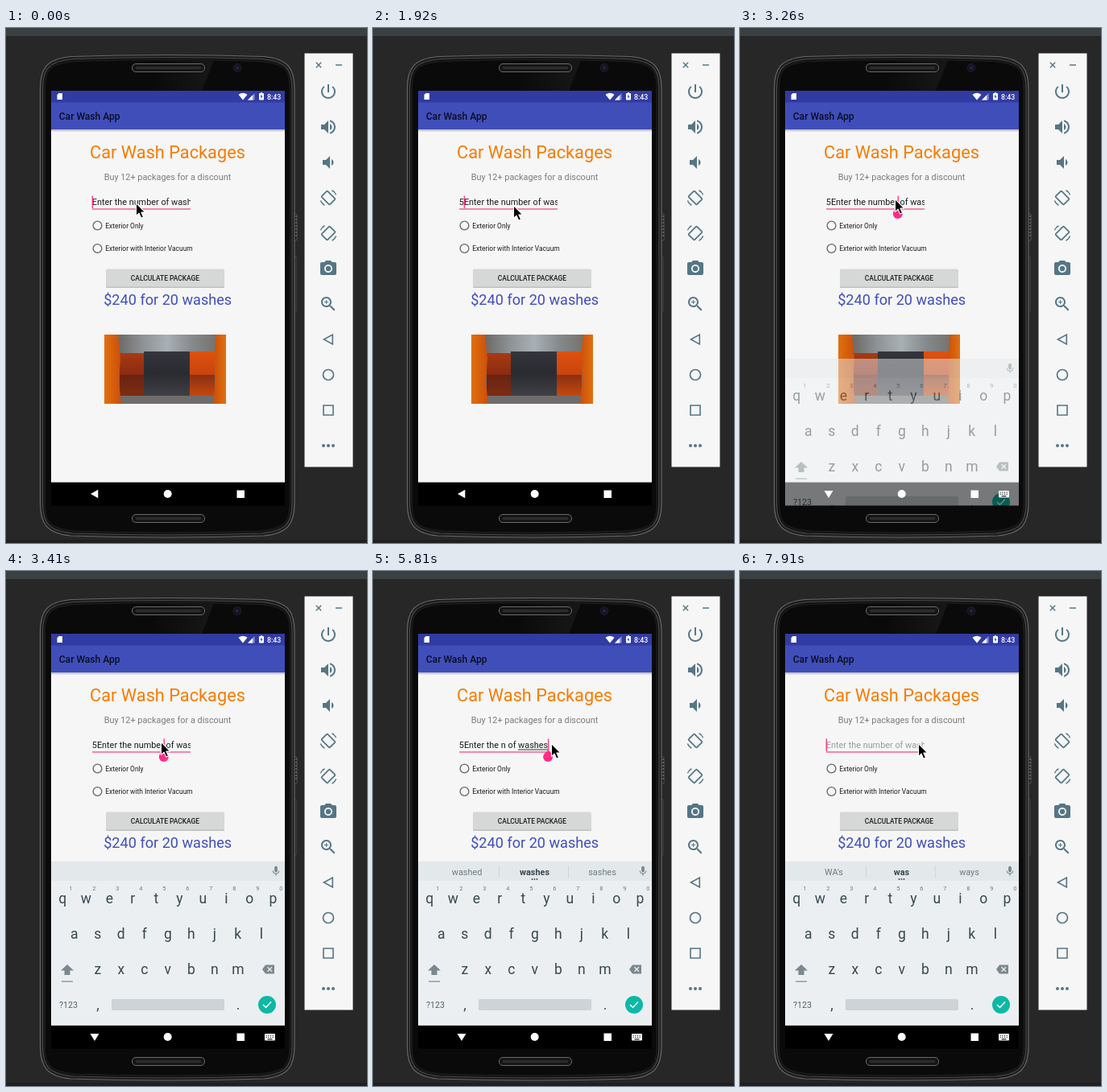
Write an HTML page with a canvas that moves like this. It is 448 px wide and 640 px high and loops after 8000 ms.

```html
<!DOCTYPE html>
<html lang="en">
<head>
<meta charset="utf-8">
<title>Car Wash App</title>
<style>
html, body { margin: 0; width: 100%; height: 100%; overflow: hidden; background: #272727; }
canvas { display: block; width: 448px; height: 640px; }
</style>
</head>
<body>
<canvas id="stage" width="448" height="640"></canvas>
<script>
const W = 448, H = 640, LOOP = 8000;
const DP = 290 / 480;
const PINK = '#f0407f', SLATE = '#37474f', STEEL = '#557686';
const view = document.getElementById('stage').getContext('2d');
let g = view;

function layer(paint) {
  const c = document.createElement('canvas');
  c.width = W;
  c.height = H;
  const prev = g;
  g = c.getContext('2d');
  paint();
  g = prev;
  return c;
}

function rect(x, y, w, h, fill) {
  g.fillStyle = fill;
  g.fillRect(x, y, w, h);
}

function round(x, y, w, h, r, fill, stroke, lw = 1) {
  g.beginPath();
  g.roundRect(x, y, w, h, r);
  finish(fill, stroke, lw);
}

function disc(x, y, r, fill, stroke, lw = 1) {
  g.beginPath();
  g.arc(x, y, r, 0, 7);
  finish(fill, stroke, lw);
}

function poly(pts, fill, stroke, lw = 1) {
  g.beginPath();
  for (let i = 0; i < pts.length; i += 2) g.lineTo(pts[i], pts[i + 1]);
  g.closePath();
  finish(fill, stroke, lw);
}

function line(x1, y1, x2, y2, color, lw = 1) {
  g.beginPath();
  g.moveTo(x1, y1);
  g.lineTo(x2, y2);
  finish(null, color, lw);
}

function finish(fill, stroke, lw) {
  if (fill) { g.fillStyle = fill; g.fill(); }
  if (stroke) { g.strokeStyle = stroke; g.lineWidth = lw; g.stroke(); }
}

function font(size, weight = 400) {
  g.font = `${weight} ${size}px Roboto, sans-serif`;
}

function text(s, x, y, size, color, align = 'left', weight = 400) {
  font(size, weight);
  g.textAlign = align;
  g.fillStyle = color;
  g.fillText(s, x, y);
}

// 24-unit icon centred on x, y
function icon(d, x, y, color, scale = 1) {
  g.save();
  g.translate(x, y);
  g.scale(scale, scale);
  g.translate(-12, -12);
  g.fillStyle = color;
  g.fill(new Path2D(d));
  g.restore();
}

function gradient(x1, y1, x2, y2, ...colors) {
  const gr = g.createLinearGradient(x1, y1, x2, y2);
  colors.forEach((c, i) => gr.addColorStop(i / (colors.length - 1), c));
  return gr;
}

const ICONS = {
  power: 'M13 3h-2v10h2V3zm4.83 2.17l-1.42 1.42C17.99 7.86 19 9.81 19 12c0 3.87-3.13 7-7 7s-7-3.13-7-7c0-2.19 1.01-4.14 2.58-5.42L6.17 5.17C4.23 6.82 3 9.26 3 12c0 4.97 4.03 9 9 9s9-4.03 9-9c0-2.74-1.23-5.18-3.17-6.83z',
  louder: 'M3 9v6h4l5 5V4L7 9H3zm13.5 3c0-1.77-1.02-3.29-2.5-4.03v8.05c1.48-.73 2.5-2.25 2.5-4.02zM14 3.23v2.06c2.89.86 5 3.54 5 6.71s-2.11 5.85-5 6.71v2.06c4.01-.91 7-4.49 7-8.77s-2.99-7.86-7-8.77z',
  softer: 'M18.5 12c0-1.77-1.02-3.29-2.5-4.03v8.05c1.48-.73 2.5-2.25 2.5-4.02zM5 9v6h4l5 5V4L9 9H5z',
  camera: 'M9 2L7.17 4H4c-1.1 0-2 .9-2 2v12c0 1.1.9 2 2 2h16c1.1 0 2-.9 2-2V6c0-1.1-.9-2-2-2h-3.17L15 2H9zm3 15c-2.76 0-5-2.24-5-5s2.24-5 5-5 5 2.24 5 5-2.24 5-5 5z',
  zoom: 'M15.5 14h-.79l-.28-.27C15.41 12.59 16 11.11 16 9.5 16 5.91 13.09 3 9.5 3S3 5.91 3 9.5 5.91 16 9.5 16c1.61 0 3.09-.59 4.23-1.57l.27.28v.79l5 4.99L20.49 19l-4.99-5zm-6 0C7.01 14 5 11.99 5 9.5S7.01 5 9.5 5 14 7.01 14 9.5 11.99 14 9.5 14zM12 10h-2v2H9v-2H7V9h2V7h1v2h2v1z',
  mic: 'M12 14c1.66 0 3-1.34 3-3V5c0-1.66-1.34-3-3-3S9 3.34 9 5v6c0 1.66 1.34 3 3 3zm5.3-3c0 3-2.54 5.1-5.3 5.1S6.7 14 6.7 11H5c0 3.41 2.72 6.23 6 6.72V21h2v-3.28c3.28-.48 6-3.3 6-6.72h-1.7z'
};

// Phone outline with gently arched ends, inset by d
function shell(d, fill, stroke, lw) {
  const l = 42.5 + d, r = 358 - d, t = 33.5 + d, b = 633 - d, mid = (l + r) / 2;
  g.beginPath();
  g.moveTo(l, 76);
  g.bezierCurveTo(l, 50, l + 8, t + 5, l + 38, t + 2);
  g.quadraticCurveTo(mid, t - 2, r - 38, t + 2);
  g.bezierCurveTo(r - 8, t + 5, r, 50, r, 76);
  g.lineTo(r, 590);
  g.bezierCurveTo(r, 616, r - 8, b - 5, r - 38, b - 2);
  g.quadraticCurveTo(mid, b + 2, l + 38, b - 2);
  g.bezierCurveTo(l + 8, b - 5, l, 616, l, 590);
  g.closePath();
  finish(fill, stroke, lw);
}

function paintPhone() {
  rect(0, 0, W, H, '#272727');
  rect(0, 0, W, 10, '#3b4043');
  rect(0, 636, W, 4, '#202020');
  round(357, 231, 4, 33, 1, '#191919', '#626262', 0.8);
  for (let y = 234; y < 262; y += 4) line(359, y, 361, y, '#8a8a8a');
  round(357, 284, 3, 69, 1, '#191919', '#555', 0.8);
  shell(0, '#1c1c1c', '#686868', 1.2);
  shell(3, '#141414', '#484848', 1.2);
  shell(6, '#0a0a0a', '#1f1f1f', 1);
  poly([190, 40, 258, 40, 243, 78, 180, 78], gradient(180, 0, 255, 0, '#0a0a0a', '#171717'));
  for (const y of [44, 604]) {
    round(156.5, y + 0.5, 90, 10, 4.5, '#171717', '#686868');
    round(160, y + 3, 83, 5, 2, '#2b2b2b', '#0c0c0c');
  }
  disc(287, 49.5, 5, '#141420', '#20202c');
  disc(287, 49.5, 2, '#24244a');
}

function paintStatus() {
  const bar = 78 + 24 * DP, end = bar + 56 * DP;
  rect(56, 78, 290, 15, '#313ba3');
  rect(56, bar, 290, end - bar, '#404eba');
  rect(56, end, 290, 3, gradient(0, end, 0, end + 3, '#b9b9bc', '#f6f6f6'));
  text('Car Wash App', 65.7, 114, 20 * DP, '#0b0e22', 'left', 500);
  text('8:43', 324, 88.5, 8.8, '#fff', 'left', 500);
  poly([65.5, 81, 70, 81, 70, 89, 63.5, 89, 63.5, 83], '#fff');
  g.beginPath();
  g.moveTo(294, 89.5);
  g.lineTo(288.5, 82.8);
  g.quadraticCurveTo(294, 78.8, 299.5, 82.8);
  g.closePath();
  finish('#fff');
  poly([308.5, 81, 308.5, 89.5, 300, 89.5], '#8d93cf');
  poly([306, 83.5, 306, 89.5, 300, 89.5], '#fff');
  round(314, 81, 6, 8.5, 0.8, '#fff');
  rect(316, 80, 2, 1.5, '#fff');
  poly([317.4, 82.3, 315.4, 85.6, 316.8, 85.6, 316.6, 88, 318.6, 84.8, 317.2, 84.8], '#313ba3');
}

function paintPhoto() {
  rect(122, 381, 151, 86, '#6f6c6b');
  rect(140, 381, 120, 24, gradient(140, 0, 260, 0, '#6d6a66', '#8d9296', '#a9b0b5', '#858b8e', '#77736d'));
  rect(141, 404, 31, 27, gradient(0, 404, 0, 431, '#a83a12', '#8a2b10'));
  rect(141, 431, 31, 26, gradient(0, 431, 0, 457, '#6a2312', '#7d2c12'));
  rect(171, 402, 58, 55, gradient(0, 402, 0, 457, '#34353c', '#2a2b31', '#3f3f45'));
  rect(228, 402, 31, 29, gradient(0, 402, 0, 431, '#dd5210', '#c8430d'));
  rect(228, 431, 31, 26, gradient(0, 431, 0, 457, '#8a3012', '#c4480f'));
  poly([122, 381, 139, 381, 142, 410, 140, 440, 143, 467, 122, 467], gradient(122, 0, 143, 0, '#e0700f', '#cb4f0b'));
  poly([261, 381, 273, 381, 273, 467, 257, 467, 260, 438, 258, 408], gradient(257, 0, 273, 0, '#cb4f0b', '#e0700f'));
}

function paintApp() {
  rect(56, 78, 290, 515.6, '#000');
  rect(56, 126, 290, 438.6, '#f6f6f6');
  paintStatus();
  text('Car Wash Packages', 200.5, 161.5, 36 * DP, '#f57c00', 'center');
  text('Buy 12+ packages for a discount', 200.5, 189, 18 * DP, '#7b7b7b', 'center');
  rect(107, 224.4, 122, 2 * DP, PINK);
  [['Exterior Only', 245.5], ['Exterior with Interior Vacuum', 274]].forEach(([s, y]) => {
    disc(113.5, y, 5.4, null, '#666', 1.3);
    text(s, 123.2, y + 3.2, 14 * DP, '#1c1c1c');
  });
  round(124, 301, 147, 22, 1.5, '#c0c0c0');
  round(124, 299.5, 147, 22, 1.5, '#d6d7d7');
  text('CALCULATE PACKAGE', 197.5, 313.7, 14 * DP, '#1c1c1c', 'center', 500);
  text('$240 for 20 washes', 200.7, 344.4, 30 * DP, '#404eba', 'center');
  paintPhoto();
}

// Tilted device with an arc at two corners; flip is 1 or -1
function paintRotate(y, flip) {
  g.save();
  g.translate(400, y);
  g.scale(flip, 1);
  g.rotate(Math.PI / 4);
  round(-7.2, -5.2, 14.4, 10.4, 1.2, null, STEEL, 1.8);
  for (const a of [-1.9, 1.25]) {
    g.beginPath();
    g.arc(0, 0, 10.3, a, a + 0.75);
    finish(null, STEEL, 1.5);
  }
  g.restore();
}

function paintToolbar() {
  rect(370.5, 31.5, 60, 514, '#f6f6f6');
  line(384.8, 42.8, 391.2, 49.2, STEEL, 1.4);
  line(391.2, 42.8, 384.8, 49.2, STEEL, 1.4);
  line(409, 46, 417, 46, STEEL, 1.5);
  icon(ICONS.power, 400, 79, STEEL);
  icon(ICONS.louder, 400, 123, STEEL);
  icon(ICONS.softer, 400, 167, STEEL);
  paintRotate(211, 1);
  paintRotate(255, -1);
  icon(ICONS.camera, 400, 299, STEEL);
  disc(400, 299, 3.2, STEEL);
  icon(ICONS.zoom, 400, 343, STEEL);
  poly([394.5, 387, 405.3, 381, 405.3, 393], null, STEEL, 1.6);
  disc(400, 431, 6.5, null, STEEL, 1.7);
  round(394, 469, 12, 12, 0, null, STEEL, 1.6);
  for (const x of [394, 400, 406]) disc(x, 519, 2, STEEL);
}

function paintKeys() {
  rect(56, 361, 290, 203.6, '#eceff1');
  rect(56, 361, 290, 24, '#e3e8eb');
  icon(ICONS.mic, 335, 373, '#78868c', 0.62);
  ['qwertyuiop', 'asdfghjkl', 'zxcvbnm'].forEach((row, r) => {
    [...row].forEach((ch, i) => {
      const x = 70.3 + 29 * i + [0, 14.5, 43.5][r];
      text(ch, x, 412.5 + 44 * r, 17.5, SLATE, 'center');
      if (!r) text((i + 1) % 10, x + 10, 397, 7.4, '#6d7a80', 'center');
    });
  });
  poly([76, 489, 84, 496.5, 79.5, 496.5, 79.5, 502, 72.5, 502, 72.5, 496.5, 68, 496.5], '#7b888e');
  rect(69, 509.5, 14, 1.2, '#7b888e');
  poly([322, 489.5, 333, 489.5, 333, 500.5, 322, 500.5, 318, 495], '#7b888e');
  line(324.5, 492.2, 330, 497.8, '#eceff1', 1.3);
  line(330, 492.2, 324.5, 497.8, '#eceff1', 1.3);
  text('?123', 77.5, 543, 10.6, '#52616a', 'center');
  text(',', 114, 544.5, 17.5, SLATE, 'center');
  text('.', 288, 544.5, 17.5, SLATE, 'center');
  round(131, 532, 140, 14, 1.5, '#cdd3d6');
  disc(324, 539, 11, '#0cb8a6');
  g.beginPath();
  g.moveTo(319, 539);
  g.lineTo(322.5, 542.5);
  g.lineTo(329, 535.5);
  finish(null, '#fff', 1.5);
}

function paintWords(words) {
  for (const x of [156.5, 242.5]) line(x, 366, x, 381, '#cfd5d8');
  words.forEach((s, i) => {
    text(s, [116.5, 200.5, 284.5][i], 377.5, 18 * DP, i === 1 ? SLATE : '#6d7a80', 'center', i === 1 ? 700 : 400);
  });
  for (const x of [197.5, 200.5, 203.5]) disc(x, 383, 0.9, SLATE);
}

function paintNav(open) {
  if (open) {
    poly([104.5, 575, 115.5, 575, 110, 584], '#fff');
    round(321, 575, 13, 8.5, 1, '#fff');
    for (let i = 0; i < 8; i++) rect(322.5 + (i % 4) * 2.7, 576.5 + (i >> 2) * 2.3, 1.2, 1.2, '#222');
    rect(324.5, 581.2, 6, 1.2, '#222');
  } else {
    poly([105, 579, 114.3, 573.7, 114.3, 584.3], '#fff');
  }
  disc(200.7, 579, 5, '#fff');
  rect(286.5, 574.5, 9.5, 9.5, '#fff');
}

const FIELD = { x: 106.8, y: 220.3, size: 18 * DP };

function paintField(s) {
  font(FIELD.size);
  const at = n => FIELD.x + g.measureText(s.text.slice(0, n)).width;
  g.save();
  g.beginPath();
  g.rect(106, 206, 123, 20);
  g.clip();
  text(s.text, FIELD.x, FIELD.y, FIELD.size, s.hint ? '#9a9a9a' : '#1c1c1c');
  if (s.mark) rect(at(s.mark[0]), 221.5, at(s.mark[1]) - at(s.mark[0]), 1, '#333');
  if (s.blink) rect(at(s.caret) - 0.2, 208.5, 1.4, 15.5, '#ff3b84');
  g.restore();
  if (s.handle) {
    const x = at(s.caret);
    poly([x, 223, x + 4.3, 227, x, 231, x - 4.3, 227], '#ff2d85');
    disc(x, 231, 6, '#ff2d85');
  }
}

function paintPointer([x, y]) {
  const d = [0, 0, 0, 16, 3.6, 12.6, 6.2, 18.6, 9, 17.4, 6.4, 11.6, 11.3, 11.6];
  g.lineJoin = 'round';
  poly(d.map((v, i) => v + (i % 2 ? y : x) + 0.5), '#000', '#fff', 1.1);
  g.lineJoin = 'miter';
}

const typed = (s, more) => ({ text: s, caret: s.length, blink: true, ...more });
const HINT = 'Enter the number of washes';
const HEAD = '5Enter the ', TAIL = ' of washes';
const editing = word => ({ text: HEAD + word + TAIL, caret: 11 + word.length, mark: [11, 11 + word.length], blink: true, handle: false });

// Each step overrides part of the state from its time on
const STEPS = [
  [0, { text: HINT, caret: 0, blink: true, pointer: [161, 217], keys: 0, words: null }],
  [140, { pointer: [159.5, 215.5] }],
  [430, { blink: false }],
  [1030, { text: '5' + HINT, caret: 1, blink: true }],
  [1480, { pointer: [163, 217], blink: false }],
  [1630, { pointer: [168, 219] }],
  [1780, { pointer: [172, 220] }],
  [1920, { pointer: [174, 220], blink: true }],
  [2370, { pointer: [178, 219], blink: false }],
  [2520, { pointer: [187, 215] }],
  [2670, { pointer: [192, 212], blink: true }],
  [2960, { caret: 17, handle: true }],
  [3110, { keys: 0.18 }],
  [3260, { keys: 0.5 }],
  [3410, { keys: 1 }],
  [3560, editing('numbe')],
  [3710, editing('num')],
  [3860, { ...editing('n'), words: ['n', 'nu', 'nurse'] }],
  [4010, { words: ['in', 'n', 'not'] }],
  [4460, { blink: false }],
  [4610, { pointer: [199, 212] }],
  [4760, { pointer: [208, 212], blink: true }],
  [5060, { pointer: [216, 213] }],
  [5210, { pointer: [221, 214] }],
  [5360, { caret: 22, handle: true, mark: null }],
  [5510, { mark: [16, 22] }],
  [5660, { words: ['washed', 'washes', 'sashes'] }],
  [6110, typed('5Enter the n of washe', { mark: [16, 21], handle: false })],
  [6260, typed('5Enter the n of wash', { mark: [16, 20] })],
  [6410, typed('5Enter the n of was', { mark: [16, 19] })],
  [6560, { words: ["WA's", 'was', 'ways'] }],
  [6860, typed('5Enter the n of', { mark: null })],
  [7010, typed('5Enter the n o')],
  [7160, typed('5Enter the n')],
  [7310, typed('5Enter the')],
  [7460, typed('5Enter')],
  [7610, typed('5En')],
  [7760, typed('5')],
  [7910, { text: HINT, caret: 0, hint: true }]
];

const stateAt = t => Object.assign({}, ...STEPS.filter(s => s[0] <= t).map(s => s[1]));

const base = layer(() => { paintPhone(); paintApp(); paintToolbar(); });
const keyboard = layer(paintKeys);

function draw(t) {
  const s = stateAt(t);
  g.drawImage(base, 0, 0);
  paintField(s);
  if (s.keys) {
    g.save();
    g.beginPath();
    g.rect(56, 78, 290, 515.6);
    g.clip();
    g.globalAlpha = s.keys;
    g.drawImage(keyboard, 0, 100 * (1 - s.keys));
    if (s.words) paintWords(s.words);
    g.restore();
  }
  paintNav(s.keys > 0);
  paintPointer(s.pointer);
}

const start = performance.now();
function tick() {
  draw((performance.now() - start) % LOOP);
  requestAnimationFrame(tick);
}
tick();
</script>
</body>
</html>
```
